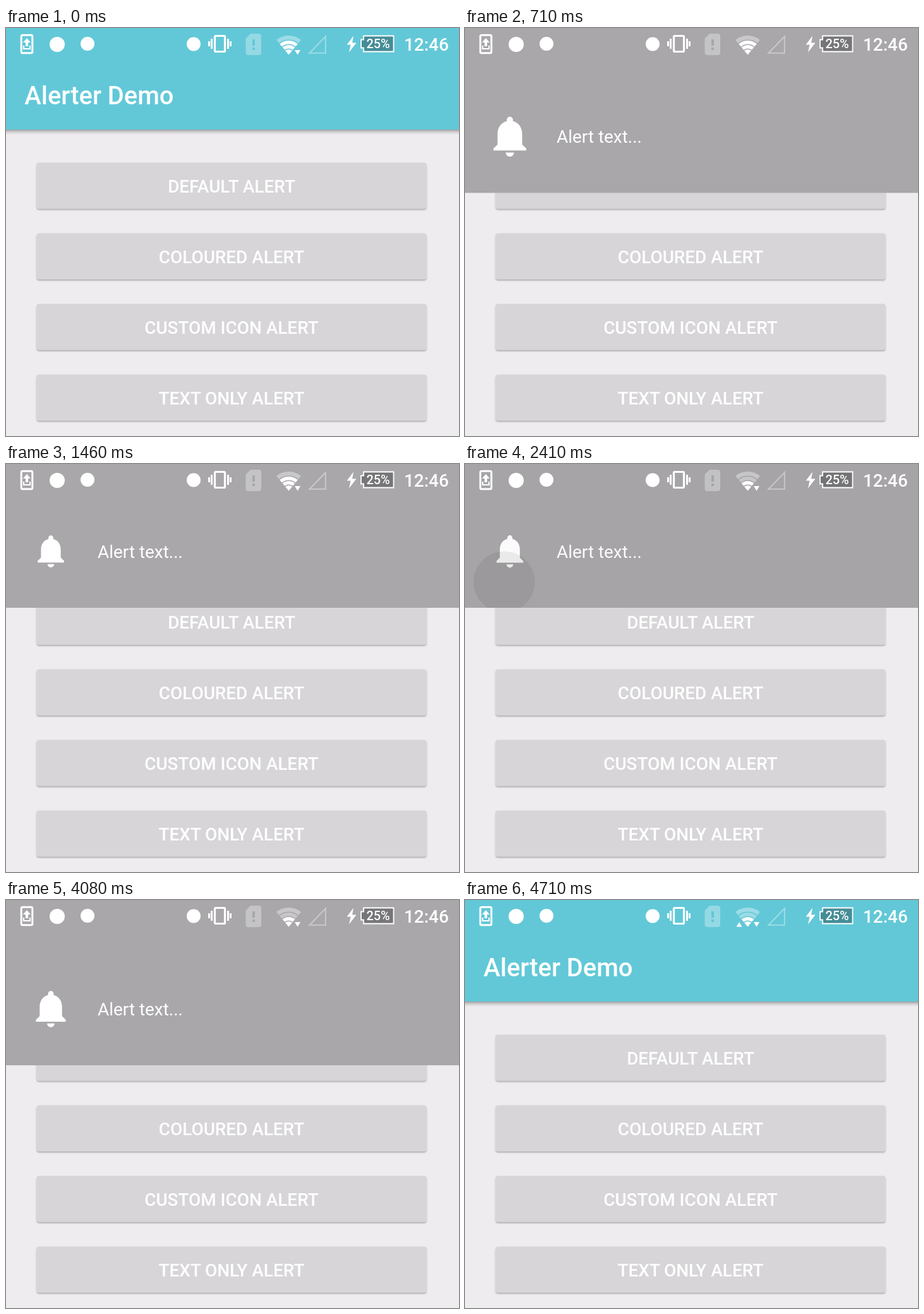
An HTML page for the animation above (4750 ms loop, 717 px wide and 647 px high).

```html
<!DOCTYPE html>
<html lang="en">
<head>
<meta charset="utf-8">
<title>Alerter Demo</title>
<style>
  html, body { margin: 0; width: 100%; height: 100%; overflow: hidden; background: #eeecef; }
  svg { display: block; width: 717px; height: 647px; }
  text { font-family: Roboto, sans-serif; fill: #fff; }
  .medium { font-weight: 500; }
</style>
</head>
<body>
<svg viewBox="0 0 717 647">
  <defs>
    <linearGradient id="barShadow" x2="0" y2="1">
      <stop offset="0" stop-color="#000" stop-opacity=".34"/>
      <stop offset=".4" stop-color="#000" stop-opacity=".15"/>
      <stop offset="1" stop-color="#000" stop-opacity="0"/>
    </linearGradient>
    <filter id="buttonShadow" x="-2%" y="-10%" width="104%" height="125%">
      <feDropShadow dx="0" dy="1.8" stdDeviation="1.3" flood-opacity=".32"/>
    </filter>
    <clipPath id="alertClip"><rect y="-129" width="717" height="357"/></clipPath>
  </defs>

  <rect width="717" height="647" fill="#eeecef"/>
  <g id="buttons"></g>
  <rect y="161" width="717" height="8" fill="url(#barShadow)"/>
  <rect width="717" height="161" fill="#62c8d7"/>
  <text class="medium" x="29.3" y="121" font-size="39.8">Alerter Demo</text>

  <g id="alert" clip-path="url(#alertClip)">
    <rect y="-129" width="717" height="357" fill="#a9a7aa"/>
    <path id="bell" fill="#fff" d="M12 22c1.1 0 2-.9 2-2h-4c0 1.1.89 2 2 2zm6-6v-5c0-3.07-1.64-5.64-4.5-6.32V4c0-.83-.67-1.5-1.5-1.5s-1.5.67-1.5 1.5v.68C7.63 5.36 6 7.92 6 11v5l-2 2v1h16v-1l-2-2z"/>
    <text x="145" y="148.5" font-size="27.9">Alert text...</text>
    <rect id="pressTint" y="-129" width="717" height="357"/>
    <circle id="ripple" cx="62" cy="187"/>
  </g>

  <g id="status" fill="#fff">
    <rect x="24.2" y="11.2" width="17.6" height="28.6" rx="2" fill="none" stroke="#fff" stroke-width="3"/>
    <path d="M33 16l6 7h-4v6h-4v-6h-4zM27 28h2v4h8v-4h2v6h-12z"/>
    <circle cx="81" cy="26" r="12"/>
    <circle cx="129" cy="25" r="11"/>
    <circle cx="297" cy="25.5" r="11"/>
    <rect x="330.5" y="12.5" width="16" height="25" rx="1.5" fill="none" stroke="#fff" stroke-width="3.2"/>
    <path d="M324 17h3v16h-3zM320 21h3v8h-3zM350 17h3v16h-3zM354 21h3v8h-3z"/>
    <path fill-opacity=".32" fill-rule="evenodd" d="M387 9h13a4 4 0 0 1 4 4v26a4 4 0 0 1-4 4h-16.500a4 4 0 0 1-4-4v-22.500zM390 18h4v10h-4zM390 31h4v4h-4z"/>
    <g id="wifi"></g>
    <path id="upArrow" d="M429.500 42.500h9l-4.500-7.500z"/>
    <path id="downArrow" d="M457 35h9l-4.500 7.500z"/>
    <path d="M505.800 13.500v26.300h-25.500z" fill="none" stroke="#fff" stroke-opacity=".38" stroke-width="2"/>
    <path d="M550 12.500l-10.500 14h6l-2.500 12 11.500-15h-6.500z"/>
    <path d="M566 12.500h47.500v25H566v-6h-4v-13h4z" fill="#000" fill-opacity=".3" stroke="#fff" stroke-width="1.800"/>
    <text class="medium" x="570.500" y="32" font-size="19.9">25%</text>
    <text class="medium" x="630" y="36" font-size="27.9">12:46</text>
  </g>
</svg>
<script>
const LOOP = 4750;
const ALERT_HEIGHT = 357;
const SLIDE = 500, ENTER_AT = 355, EXIT_AT = 3934.8;
const PULSE = 500, PULSE_MIN_AT = 1450;
const PRESS_AT = 2330, RELEASE_AT = 2680, FADE = 450;

const byId = id => document.getElementById(id);
const clamp = value => Math.min(1, Math.max(0, value));
const set = (id, attrs) => {
  for (const [name, value] of Object.entries(attrs)) byId(id).setAttribute(name, value);
};

byId('buttons').innerHTML = ['DEFAULT', 'COLOURED', 'CUSTOM ICON', 'TEXT ONLY'].map((label, i) => `
  <g transform="translate(0 ${i * 112})">
    <rect x="48.500" y="213.500" width="617" height="73" rx="4" fill="#d7d5d8" filter="url(#buttonShadow)"/>
    <text class="medium" x="357" y="261" font-size="27.9" text-anchor="middle">${label} ALERT</text>
  </g>`).join('');

// One band of the Wi-Fi fan, between two radii around its lower tip.
function wifiBand([inner, outer], i) {
  const angle = 0.69, x = 447.5, y = 42.5;
  const point = (radius, side) => `${x + side * radius * Math.sin(angle)} ${y - radius * Math.cos(angle)}`;
  return `<path id="band${i}" d="M${point(inner, -1)}L${point(outer, -1)}
    A${outer} ${outer} 0 0 1 ${point(outer, 1)}L${point(inner, 1)}
    A${inner} ${inner} 0 0 0 ${point(inner, -1)}z"/>`;
}
byId('wifi').innerHTML = [[24, 30.5], [17, 22.5], [10, 15.5], [0, 8.5]].map(wifiBand).join('');

function alertOffset(t) {
  const enter = clamp((t - ENTER_AT) / SLIDE) - 1;
  const exit = clamp((t - EXIT_AT) / SLIDE);
  const overshoot = enter * enter * (3 * enter + 2);
  const anticipate = exit * exit * (3 * exit - 2);
  return ALERT_HEIGHT * (overshoot - anticipate);
}

function drawRipple(t) {
  const held = Math.max(0, Math.min(t, RELEASE_AT) - PRESS_AT);
  const release = clamp((t - RELEASE_AT) / FADE);
  const spread = 1 - (1 - release) ** 2;
  const strength = 1 - release;
  set('ripple', { r: held * 0.6 + spread * 500, opacity: 0.066 * strength });
  set('pressTint', { opacity: 0.03 * clamp(held / 140) * strength });
}

function drawWifi(t) {
  const between = (from, to) => t >= from && t < to;
  const strongBand = t < 1935 ? 1 : 2;
  for (let i = 0; i < 4; i++) set('band' + i, { 'fill-opacity': i < strongBand ? 0.36 : 1 });
  set('downArrow', { opacity: between(85, 1010) ? 0 : 1 });
  set('upArrow', { opacity: between(2860, 3790) || t >= 4710 ? 1 : 0 });
}

function draw(t) {
  set('alert', { transform: `translate(0 ${alertOffset(t)})` });
  const pulse = 0.9 - 0.1 * Math.cos((t - PULSE_MIN_AT) / PULSE * 2 * Math.PI);
  set('bell', { transform: `translate(71 138) scale(${3.25 * pulse}) translate(-12 -12)` });
  drawRipple(t);
  drawWifi(t);
}

const start = performance.now();
function tick() {
  draw((performance.now() - start) % LOOP);
  requestAnimationFrame(tick);
}
tick();
</script>
</body>
</html>
```
